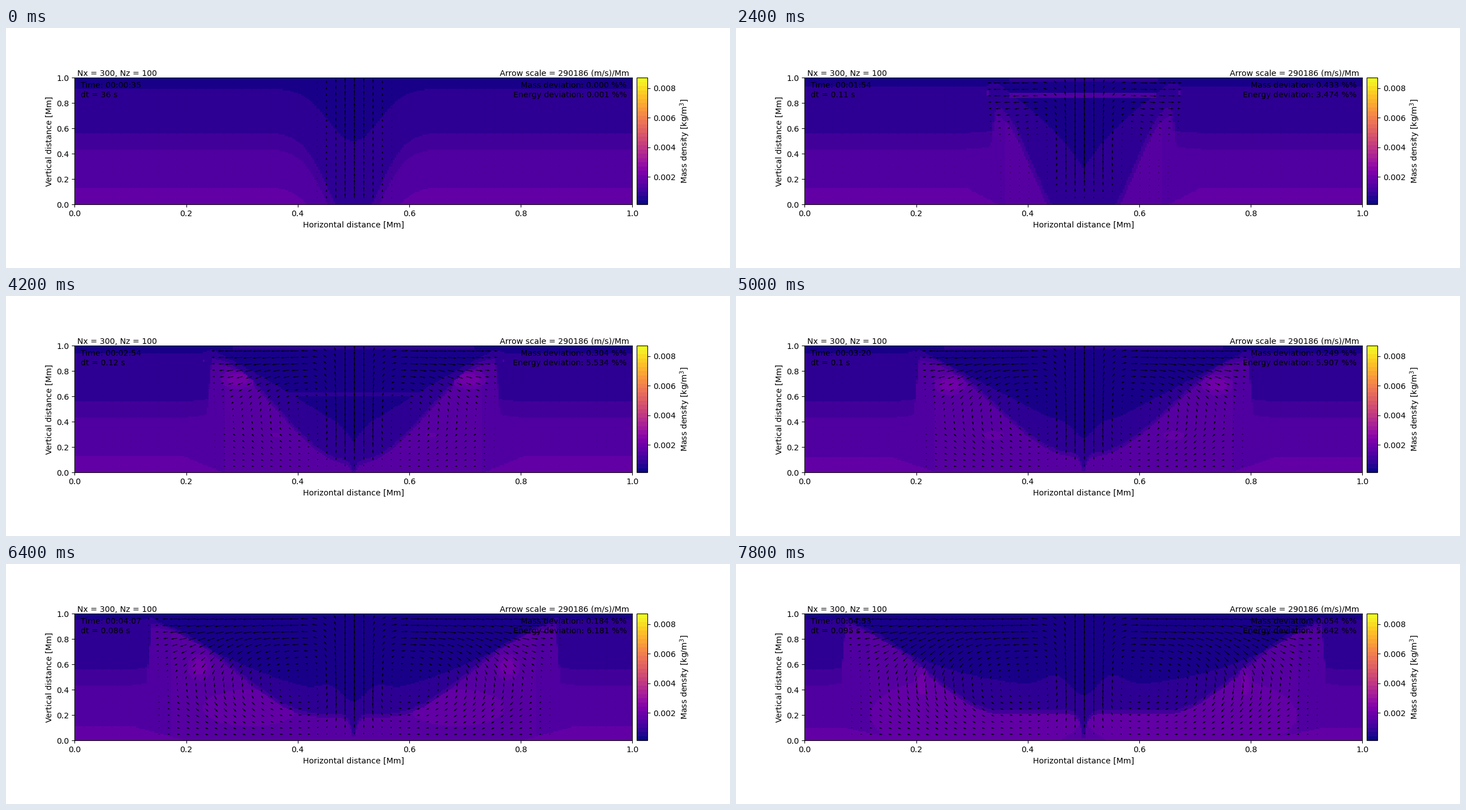
Animation, 1280 px wide and 426 px high, one loop 8 s. Source, as a matplotlib script:

```python
import numpy as np
import matplotlib.pyplot as plt
from matplotlib.animation import FuncAnimation
from matplotlib.cm import ScalarMappable
from matplotlib.colors import Normalize

W, H = 1280, 426
FRAMES, STEP = 40, 200
KEYS = [7, 16, 28, 39]
plt.rcParams.update({"font.family": "DejaVu Sans", "font.size": 10.2})

# Density shades from thin to dense
SHADES = np.array([
    (25, 0, 137), (45, 0, 147), (66, 0, 154), (80, 0, 160),
    (87, 0, 162), (98, 0, 166), (112, 0, 168)], dtype=np.uint8)

x = (np.arange(300) + .5) / 300
z = ((np.arange(100) + .5) / 100)[:, None]
d = np.abs(x - .5)

qx, qz = np.meshgrid(np.arange(0, 300, 5) / 299, np.arange(5, 100, 5) / 99)
qd, side = np.abs(qx - .5017), np.sign(qx - .5017)


def at(n, *values):
    """Value at frame n, given its values at the key frames."""
    return np.interp(n, KEYS, values)


def ramp(t):
    return np.clip(t, 0, 1)


def smooth(t):
    t = ramp(t)
    return t * t * (3 - 2 * t)


def bump(v, center, width):
    return np.exp(-((v - center) / width) ** 2)


def front_at(n):
    return at(n, .0995, .203, .325, .426)


def layers(n):
    """Heights of the four boundaries between density bands."""
    front = front_at(n)
    u, tail = d / front, np.maximum(d - front, 0)
    late = ramp((n - 16) / 23)
    sag = .01 * n / 39

    # Hot bubble: a bowl whose walls open as the front moves out
    bottom = at(n, .33, .21, .32, .43)
    floor = bottom + (.97 - bottom) * np.minimum(u, 1) ** (.75 + 1.7 * late ** 2)
    floor += .08 * late * (bump(u, .12, .07) - bump(u, 0, .06))

    low, start = at(n, -.3, .04, .2, .24), at(n, .35, .04, .07, .35)
    shell = low + (at(n, .63, .88, .92, .92) - low) * smooth((u - start) / (1 - start))
    shell -= .25 * late ** .5 * np.exp(-d / .006)
    gap = at(n, .12, .035, .03, .03)

    def join(inner, far, width):
        return far + (inner - far) * ramp(1 - tail / width)

    swell = np.exp(-tail / .02)
    b1 = join(floor, at(n, .915, .935, .945, .947), .02)
    b2 = join(shell, .565 - sag + .03 * swell, .007)
    b3 = join(shell - gap, .435 - sag + .045 * swell, .009)
    foot = front * at(n, 1, .95, .88, .75)
    b4 = at(n, .135, .135, .117, .1) * np.clip((d - foot) / (.06 + .05 * late), -.5, 1)

    if n < 7:
        dip = bump(d, 0, .065)
        begin = (.915 - .415 * dip, .565 - .73 * dip, .435 - .73 * dip, .135 - .7 * dip)
        return [a + (b - a) * n / 7 for a, b in zip(begin, (b1, b2, b3, b4))]
    return b1, b2, b3, b4


def density(n):
    b1, b2, b3, b4 = layers(n)
    front = front_at(n)
    band = (z < b1) * 1 + (z < b2) + (z < b3) + 2 * (z < b4)

    def raise_to(level, mask):
        band[mask] = np.maximum(band[mask], level)

    def blob(cd, cz, rd, rz):
        return ((d - cd) / (rd + 1e-4)) ** 2 + ((z - cz) / (rz + 1e-4)) ** 2 < 1

    if n > 9:
        raise_to(4, (band == 3) & (d < .9 * front))

    # Swirl that fills the cell from below
    swirl = blob(front * at(n, .55, .55, .545, .45), at(n, .3, .3, .29, .2),
                 at(n, 0, 0, .025, .19), at(n, 0, 0, .045, .32))
    raise_to(5, swirl & (band >= 3))

    # Compressed knot behind the front
    cd, cz = front * at(n, 1.05, .82, .81, .68), at(n, .95, .79, .66, .44)
    rd, rz = at(n, 0, .035, .026, .013), at(n, 0, .07, .085, .14)
    dense = band >= 2
    raise_to(5, blob(cd, cz, rd, rz) & dense)
    raise_to(6, blob(cd, cz, .6 * rd, .6 * rz) & dense)

    # Overhanging lip of the front
    lip = bump(n, 16, 3)
    raise_to(3, blob(front + .014, .88, .013 * lip, .12 * lip))

    # Layer reflected from the lid, fading as it sinks
    if 4 <= n <= 22:
        fade = ramp((n - 7) / 9)
        strip = np.abs(z - 1 + .0275 * max(n - 7, 0)) < .035 - .023 * fade
        reach = .07 + .045 * ramp((n - 4) / 3) + .03 * fade
        raise_to(round(5 - 4 * fade), strip & (d < reach))
    if 9 < n < 26:
        raise_to(1, (z > .965) & (d < front * .85))
    return SHADES[band]


def flow(n):
    """Arrow components in pixels: one cell on each side of the updraft."""
    u = qd / front_at(n)
    early = ramp(n / 7)
    cut = ramp((at(n, 1.3, 1.07, 1.05, 1.05) - u) / .2)

    shear = np.clip(2.27 * (qz - .45), -.35, 1)
    shear = np.where(shear < 0, shear * at(n, .1, .6, 1, 1), shear)
    out = early * at(n, 11, 15, 17, 17) * shear * cut * ramp((qd - .02) / .08)

    lift = 1 + early * (ramp(4 * qz) * (1 - .5 * qz ** 4) - 1)
    rise = 11 + 7 * early
    sink = early * at(n, 0, 4, 8, 10) * np.sin(np.pi * qz)
    up = rise * lift * bump(qd, 0, .052) - sink * bump(u, .65, .28) * cut
    return side * out, up


fig = plt.figure(figsize=(W / 100, H / 100), dpi=100, facecolor="white")


def box(left, top, right, bottom):
    return fig.add_axes([left / W, 1 - bottom / H, (right - left) / W, (bottom - top) / H])


ax = box(121.4, 88.4, 1107.4, 313.4)
image = ax.imshow(density(0), origin="lower", extent=(0, 1, 0, 1),
                  aspect="auto", interpolation="nearest")
arrows = ax.quiver(qx, qz, *flow(0), units="dots", scale_units="dots", scale=1,
                   width=1, minlength=.6)
ax.set(xlim=(0, 1), ylim=(0, 1), xlabel="Horizontal distance [Mm]",
       ylabel="Vertical distance [Mm]")

bar = fig.colorbar(ScalarMappable(Normalize(.00013, .00869), plt.get_cmap("plasma", 30)),
                   cax=box(1115.2, 88.4, 1134.4, 313.4), ticks=[.002, .004, .006, .008])
bar.set_label("Mass density [kg/m$^3$]")


def label(px, py, text="", ha="left"):
    return fig.text(px / W, 1 - py / H, text, ha=ha, va="baseline")


label(126, 85, "Nx = 300, Nz = 100")
label(1102, 84.5, "Arrow scale = 290186 (m/s)/Mm", "right")
clock = label(132, 106.4)
pace = label(132, 123)
mass = label(1097.5, 106.4, ha="right")
energy = label(1097.5, 123, ha="right")


def reading(n, *values):
    return np.interp(n, [0, 7, 16, 21, 28, 32, 39], values)


def draw(n):
    image.set_data(density(n))
    arrows.set_UVC(*flow(n))
    t = int(35.5 + 6.615 * n)
    clock.set_text(f"Time: 00:{t // 60:02d}:{t % 60:02d}")
    dt = reading(n, .09, .088, .12, .12, .086, .086, .095) if n else 36
    pace.set_text(f"dt = {dt:.2g} s")
    m = reading(n, 0, .385, .472, .304, .207, .184, .054)
    e = reading(n, .001, 2.065, 4.602, 5.534, 6.186, 6.181, 5.642)
    mass.set_text(f"Mass deviation: {m:.3f} %%")
    energy.set_text(f"Energy deviation: {e:.3f} %%")
    return image, arrows, clock, pace, mass, energy


anim = FuncAnimation(fig, draw, frames=FRAMES, interval=STEP, repeat=True,
                     init_func=lambda: draw(0), blit=False)
plt.show()
```
